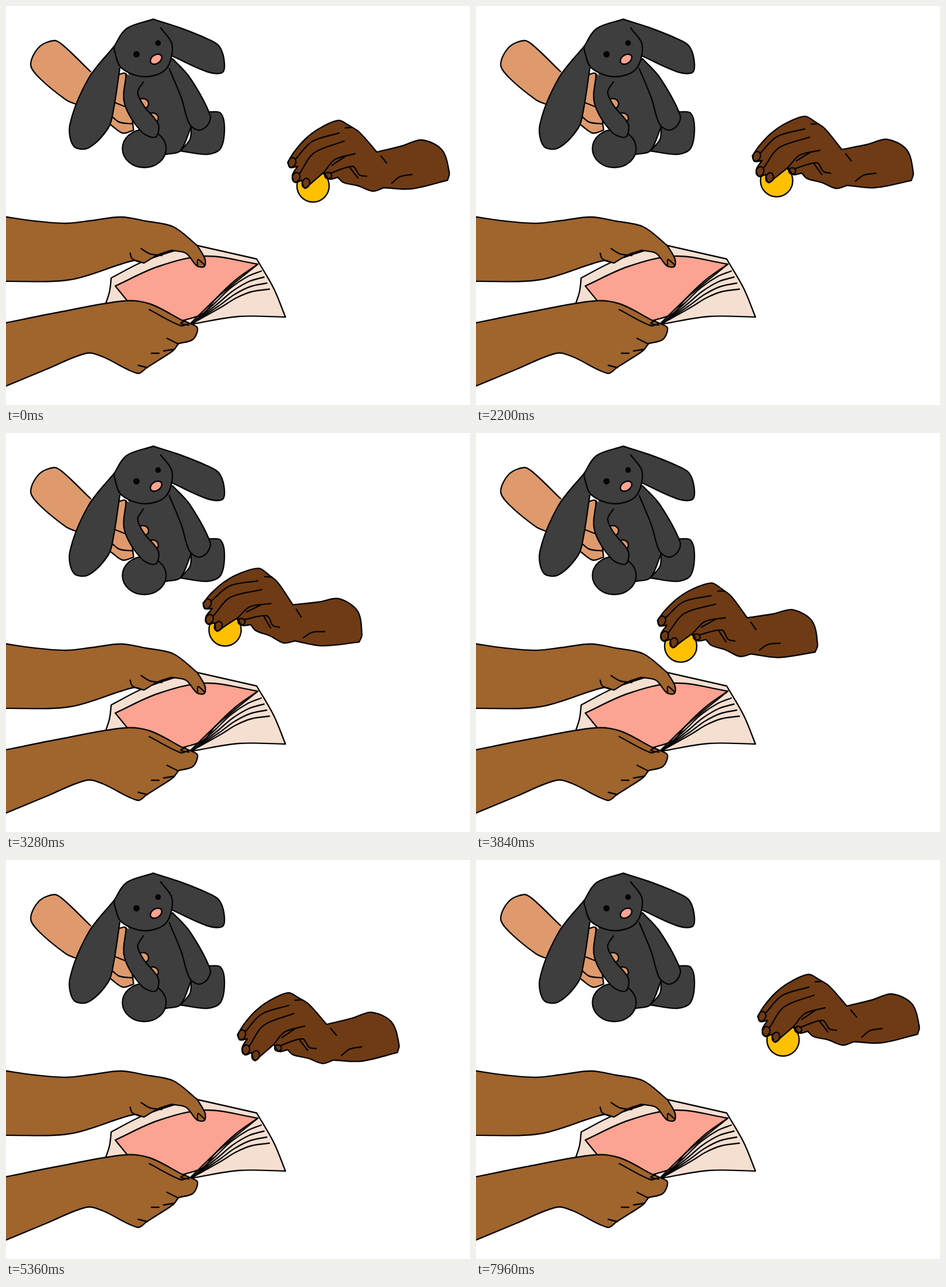
An HTML page with a canvas that plays this animation: 807x694 px, repeating every 8000 ms.

```html
<!DOCTYPE html>
<html lang="en">
<head>
<meta charset="utf-8">
<title>Giving hands</title>
<style>
html, body { margin: 0; width: 100%; height: 100%; overflow: hidden; background: #fff; }
canvas { display: block; width: 807px; height: 694px; }
</style>
</head>
<body>
<canvas id="stage" width="807" height="694"></canvas>
<script>
const ctx = document.getElementById('stage').getContext('2d');
const LOOP = 8000, STEP = 40;
const INK = '#050505', PEACH = '#de9a6c', PLUSH = '#3e3e3e', TAN = '#a0642d';
const CREAM = '#f5dfd1', PINK = '#fda392', BROWN = '#6f3b14', GOLD = '#ffc000';

// Smooth curve through "x y x y ..." key points; "|" marks a corner.
function curve(text) {
  const path = new Path2D();
  let last = null;
  for (const part of text.split('|')) {
    const n = part.trim().split(/\s+/).map(Number);
    const p = last ? [last] : [];
    for (let i = 0; i < n.length; i += 2) p.push([n[i], n[i + 1]]);
    if (!last) path.moveTo(...p[0]);
    const len = (a, b) => Math.hypot(b[0] - a[0], b[1] - a[1]);
    const slope = i => {
      const a = p[Math.max(i - 1, 0)], c = p[Math.min(i + 1, p.length - 1)];
      const d = len(a, p[i]) + len(p[i], c) || 1;
      return [(c[0] - a[0]) / d, (c[1] - a[1]) / d];
    };
    for (let i = 0; i < p.length - 1; i++) {
      const a = p[i], b = p[i + 1], d = len(a, b) / 3, u = slope(i), v = slope(i + 1);
      path.bezierCurveTo(a[0] + u[0] * d, a[1] + u[1] * d, b[0] - v[0] * d, b[1] - v[1] * d, ...b);
    }
    last = p[p.length - 1];
  }
  return path;
}

const shape = (fill, text) => ({ fill, path: curve(text) });
const line = text => shape(null, text);
function oval(fill, x, y, rx, ry = rx, turn = 0) {
  const path = new Path2D();
  path.ellipse(x, y, rx, ry, turn, 0, 7);
  return { fill, path };
}
function paint({ fill, path }) {
  if (fill) { ctx.fillStyle = fill; ctx.fill(path); }
  ctx.stroke(path);
}

const bunny = [
  shape(PEACH, '147 114 | 100 69 84 60 57 72 43 102 58 125 104 163 122 171 | 181 206 203 221 222 216 | 208 118 196 119'),
  line('187 167 212 177'),
  line('184 192 197 202 220 205'),
  shape(PLUSH, '256 23 300 37 350 57 370 69 379 92 377 115 352 115 289 87'),
  shape(PLUSH, '214 118 | 290 92 | 322 210 | 303 252 278 258 | 222 190'),
  shape(PLUSH, '322 210 320 232 303 252 | 350 258 373 248 380 212 373 186 354 184'),
  shape(PLUSH, '290 92 320 125 355 190 350 208 335 216 319 205 305 160 284 109'),
  oval(PEACH, 238, 170, 10, 9),
  oval(PEACH, 255, 195, 10, 9),
  oval(PLUSH, 240.5, 248, 38, 33),
  shape(PLUSH, '239 132 229 150 240 174 265 206 260 228 236 219 206 169 209 118'),
  shape(PLUSH, '189 69 143 127 111 207 118 244 143 247 178 212 187 180 198 108'),
  shape(PLUSH, '269 38 289 68 278 110 240 123 200 107 188 76 | 189 69 210 39 256 23'),
  oval(PINK, 261, 92.5, 11, 7.5, -0.6),
  oval(INK, 227, 84, 4.3),
  oval(INK, 264.5, 64.5, 3.7)
];

const FRONT_EDGE = '438 449 400 476 364 510 343 535 308 547';
const frontEdge = line(FRONT_EDGE);
// Page edges fan out from the spine.
const pages = [0, 1, 2, 3].map(i => line(
  `${444 + 4.7 * i} ${461 + 10.5 * i} ${421 + 2 * i} ${470 + 9 * i} ${391 + 3 * i} ${490 + 6 * i} ${365 + 3 * i} ${515 + 3 * i} 324 552`));

const receiver = [
  shape(CREAM, '173 519 180 497 183 473 | 235 446 285 428 330 416 | 436 440 | 466 492 486 541 | 405 540 325 553'),
  shape(PINK, '212 514 190 487 | 265 453 347 435 438 449 | ' + FRONT_EDGE),
  ...pages,
  line('438 449 372 503 320 553'),
  shape(TAN, '-5 366 50 374 105 378 150 373 200 367 243 374 291 384 333 417 | 346 440 345 453 332 452 313 430 288 425 | 264 433 240 447 | 221 443 112 476 -5 479'),
  line('216 430 219 439 231 445'),
  line('235 422 250 431 271 434'),
  line('333 452 334 441 345 450'),
  shape(TAN, '-5 552 90 533 205 513 250 518 305 546 | 319 552 333 560 325 580 300 587 | 291 599 267 615 245 629 | 229 639 168 610 140 604 70 632 -5 663'),
  line('249 528 304 556 318 552'),
  line('318 555 304 552 312 547'),
  line('280 578 300 588'),
  line('253 604 266 604'),
  line('274 600 293 597'),
  line('230 625 246 629')
];

const nails = [0, 1, 2].map(i => oval(null, 497.5 + 12 * i - 5 * (i % 2), 272 + 18 * i + 8 * (i % 2), 6.5, 8.5, 0.3));
const giver = [
  shape(BROWN, '490 272 501 254 521 231 545 213 578 199 597 208 | 614 219 645 254 | 690 243 723 233 758 250 771 290 768 303 | 705 318 657 316 | 638 322 613 313 587 307 577 298 | 562 301 553 289 | 531 308 520 317 514 303 | 503 307 498 295 507 279 | 494 281 490 272'),
  line('503 267 532 236 579 221'),
  line('511 291 535 256 588 235'),
  line('553 289 572 267 607 257'),
  line('567 277 591 261'),
  line('564 291 603 279 615 294 627 296'),
  line('598 281 612 299'),
  line('590 212 602 211'),
  line('652 261 662 273'),
  line('671 308 685 297 706 293'),
  ...nails,
  oval(null, 560.5, 295, 6, 5.5)
];

// Progress from 0 to 1 between two times, slow at both ends.
function ease(t, from, to) {
  const s = Math.min(1, Math.max(0, (t - from) / (to - from)));
  return (1 - Math.cos(Math.PI * s)) / 2;
}

const HOME = { x: 534, y: 313 };
const DROP = { start: 4040, end: 4840, x: 367, y: 548 };
const REFILL = { start: 7240, end: 7960 };

// The hand lifts, swoops to the envelope, settles, then goes back home.
function handAt(t) {
  const lift = ease(t, 1560, 3000), swoop = ease(t, 2510, 3560);
  const settle = ease(t, 3640, 4200), drift = ease(t, 3900, 4600);
  const back = ease(t, 4600, 6200);
  const x = -27 * lift - 151 * swoop + 16 * drift;
  const y = -22 * lift + 74 * swoop ** 2 + 20 * settle;
  return {
    x: HOME.x + x * (1 - back),
    y: HOME.y + y * (1 - back) - 60 * back ** 2 * (1 - back),
    turn: 7.6 * (ease(t, 1640, 3120) - ease(t, 3400, 4500))
  };
}

const opening = curve('0 0 | 807 0 | 807 449 | ' + FRONT_EDGE + ' | 0 547');

function drawCoin(t, hand) {
  const falling = t > DROP.start && t < DROP.end;
  if (t >= DROP.end && t <= REFILL.start) return;
  let { x, y } = hand;
  ctx.save();
  if (falling) {
    const from = handAt(DROP.start), s = ease(t, DROP.start, DROP.end);
    x = from.x + (DROP.x - from.x) * s;
    y = from.y + (DROP.y - from.y) * s;
    ctx.clip(opening);
  }
  if (t > REFILL.start) ctx.globalAlpha = Math.min(1, (t - REFILL.start) / (REFILL.end - REFILL.start));
  paint(oval(GOLD, x, y, 28));
  ctx.restore();
  if (falling) paint(frontEdge);
}

function draw(t) {
  const hand = handAt(t);
  ctx.fillStyle = '#fff';
  ctx.fillRect(0, 0, 807, 694);
  bunny.forEach(paint);
  receiver.forEach(paint);
  drawCoin(t, hand);
  ctx.save();
  ctx.translate(hand.x, hand.y);
  ctx.rotate(hand.turn * Math.PI / 180);
  ctx.translate(-HOME.x, -HOME.y);
  giver.forEach(paint);
  ctx.restore();
}

ctx.lineCap = ctx.lineJoin = 'round';
ctx.strokeStyle = INK;
ctx.lineWidth = 2.4;
const began = performance.now();
function tick() {
  const t = (performance.now() - began) % LOOP;
  draw(Math.floor(t / STEP) * STEP);
  requestAnimationFrame(tick);
}
tick();
</script>
</body>
</html>
```
